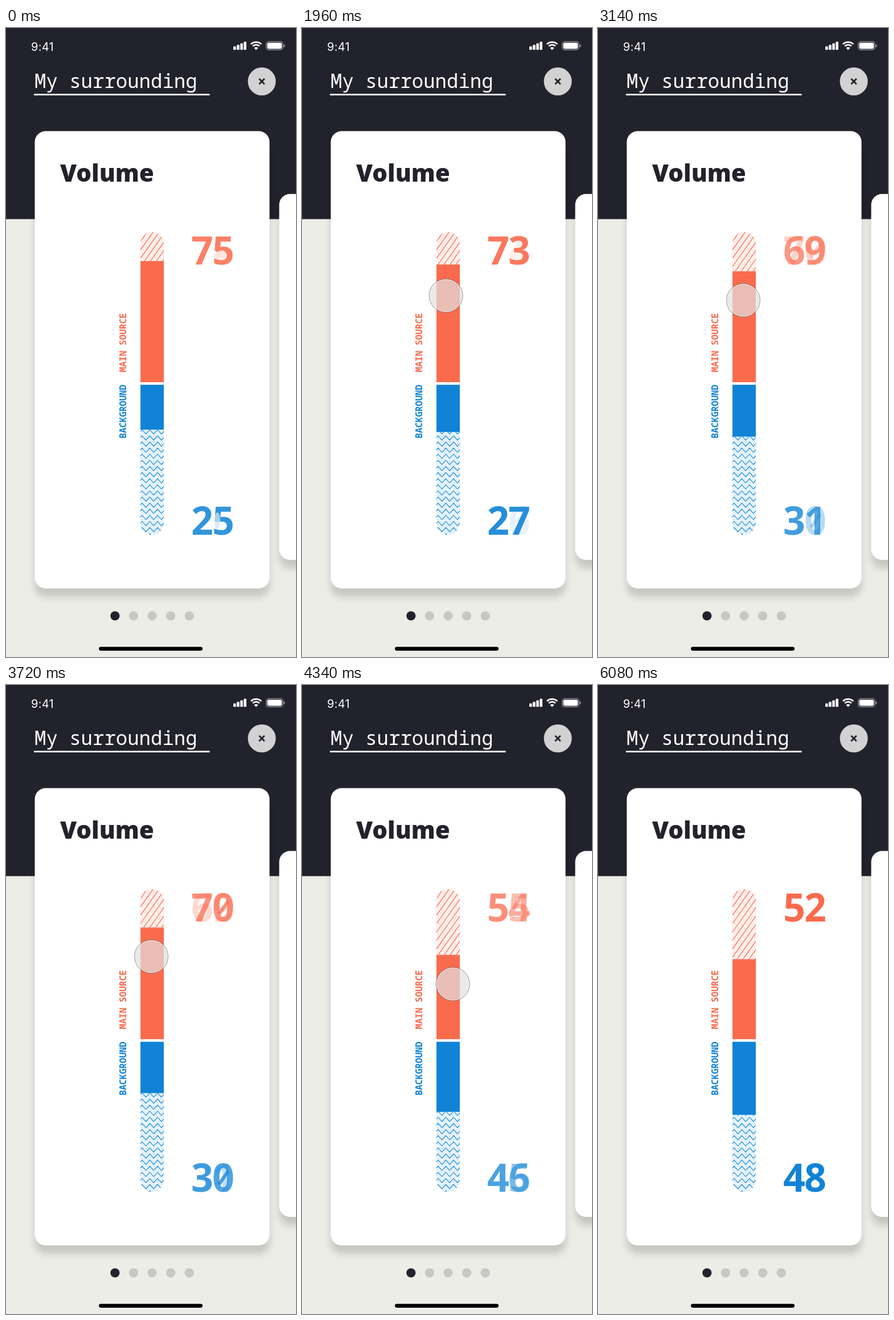
These frames come from a looping animation (509 by 1101 pixels, 7.14 s). An HTML page with a canvas:

```html
<!DOCTYPE html>
<html lang="en">
<head>
<meta charset="utf-8">
<title>Volume mixer</title>
<style>
html, body { margin: 0; width: 100%; height: 100%; overflow: hidden; background: #ecede7; }
canvas { display: block; width: 509px; height: 1101px; }
</style>
</head>
<body>
<canvas id="stage" width="509" height="1101"></canvas>
<script>
const ctx = document.getElementById('stage').getContext('2d');
const LOOP = 7140;
const DARK = '#22222c', RED = '#fa6b4e', BLUE = '#1083d6';
const MONO = '"Noto Sans Mono", "DejaVu Sans Mono", monospace';
const SANS = '"Noto Sans", "Open Sans", sans-serif';
const BAR = { x: 236, w: 41, top: 357, bottom: 887, midTop: 620, midBottom: 624.5 };

// Each move: start, end, target, easing sharpness (0 = in-out, 1 = out)
const touchMoves = [
  [560, 700, [438, 330], 0.6],
  [940, 1640, [252, 458], 0],
  [1880, 2520, [255, 502], 0.67],
  [2700, 3420, [255, 475], 1],
  [3700, 4420, [265, 525], 0.05],
  [5940, 6080, [542, 222], 0.3]
];
const levelMoves = [
  [1880, 2520, [60.5], 0.3],
  [2700, 3460, [70], 1],
  [3700, 4560, [52], 0.18]
];

function ease(p, k) {
  const smooth = p * p * (3 - 2 * p);
  const out = 1 - (1 - p) ** 3;
  return smooth + (out - smooth) * k;
}

function follow(moves, start, t) {
  let at = start;
  for (const [from, to, target, k] of moves) {
    if (t <= from) break;
    const p = ease(Math.min(1, (t - from) / (to - from)), k);
    at = at.map((v, i) => v + (target[i] - v) * p);
  }
  return at;
}

function rect(x, y, w, h, color) {
  ctx.fillStyle = color;
  ctx.fillRect(x, y, w, h);
}

function round(x, y, w, h, r, color) {
  ctx.beginPath();
  ctx.roundRect(x, y, w, h, r);
  ctx.fillStyle = color;
  ctx.fill();
}

function disc(x, y, r, color) {
  ctx.beginPath();
  ctx.arc(x, y, r, 0, Math.PI * 2);
  ctx.fillStyle = color;
  ctx.fill();
}

function text(str, x, y, font, color, spacing = 0) {
  ctx.font = font;
  ctx.letterSpacing = spacing + 'px';
  ctx.fillStyle = color;
  ctx.fillText(str, x, y);
}

function statusBar() {
  text('9:41', 44, 39.5, '400 20px Inter, "Liberation Sans", sans-serif', '#fff', 0.3);
  for (let i = 0; i < 4; i++) {
    const h = 6 + i * 2.8;
    round(399 + i * 6.1, 38.3 - h, 4.6, h, 1, '#fff');
  }
  ctx.strokeStyle = '#fff';
  ctx.lineWidth = 2.8;
  for (const r of [8.2, 12.9]) {
    ctx.beginPath();
    ctx.arc(439, 37.5, r, -Math.PI * 0.75, -Math.PI * 0.25);
    ctx.stroke();
  }
  ctx.beginPath();
  ctx.moveTo(439, 38.5);
  ctx.arc(439, 38.5, 5, -Math.PI * 0.75, -Math.PI * 0.25);
  ctx.fillStyle = '#fff';
  ctx.fill();

  ctx.strokeStyle = '#9a9a9f';
  ctx.lineWidth = 1.2;
  ctx.beginPath();
  ctx.roundRect(456.6, 23.9, 29.6, 14.4, 4);
  ctx.stroke();
  round(458.5, 25.8, 25.8, 10.6, 2.4, '#fff');
  round(487.5, 28.7, 1.8, 5, 1, '#9a9a9f');
}

function header() {
  rect(0, 0, 509, 1101, '#ecede7');
  rect(0, 0, 509, 334.5, DARK);
  statusBar();
  text('My surrounding', 50, 104.5, '300 34px ' + MONO, '#fff');
  rect(49, 115.2, 308.5, 2.7, '#fff');
  disc(449, 93.5, 24.5, '#d2d2d3');
  ctx.strokeStyle = DARK;
  ctx.lineWidth = 3;
  ctx.beginPath();
  ctx.moveTo(444.3, 88.8);
  ctx.lineTo(453.7, 98.2);
  ctx.moveTo(453.7, 88.8);
  ctx.lineTo(444.3, 98.2);
  ctx.stroke();
}

function card(x, y, w, h) {
  ctx.save();
  ctx.shadowColor = 'rgba(0,0,0,.16)';
  ctx.shadowBlur = 13;
  ctx.shadowOffsetY = 15;
  round(x, y, w, h, 19, '#fff');
  ctx.restore();
}

function label(str, y, color) {
  ctx.save();
  ctx.translate(210.7, y);
  ctx.rotate(-Math.PI / 2);
  text(str, 0, 0, '600 15.7px ' + MONO, color);
  ctx.restore();
}

function hatch(bottom) {
  ctx.save();
  ctx.beginPath();
  ctx.rect(BAR.x, BAR.top, BAR.w, bottom - BAR.top);
  ctx.clip();
  rect(BAR.x, BAR.top, BAR.w, bottom - BAR.top, '#feeeea');
  ctx.strokeStyle = RED;
  ctx.lineWidth = 1.2;
  ctx.beginPath();
  for (let x = 243 - 126; x < 400; x += 10.5) {
    ctx.moveTo(x, 408);
    ctx.lineTo(x + 60, 408 - 84);
    ctx.moveTo(x, 408);
    ctx.lineTo(x - 60, 408 + 84);
  }
  ctx.stroke();
  ctx.restore();
}

function zigzag(top) {
  ctx.save();
  ctx.beginPath();
  ctx.rect(BAR.x, top, BAR.w, BAR.bottom - top);
  ctx.clip();
  rect(BAR.x, top, BAR.w, BAR.bottom - top, '#e3f2fc');
  ctx.strokeStyle = BLUE;
  ctx.lineWidth = 1.1;
  ctx.beginPath();
  for (let y = 692.5; y < 892; y += 10.7) {
    ctx.moveTo(232, y + 7.5);
    for (let i = 1; i < 8; i++) ctx.lineTo(232 + i * 6.8, y + (i % 2 ? 0 : 7.5));
  }
  ctx.stroke();
  ctx.restore();
}

function slider(level) {
  const top = 408 + (75 - level) * 3.13;
  const bottom = 703 + (75 - level) * 2.15;
  ctx.save();
  ctx.beginPath();
  ctx.roundRect(BAR.x, BAR.top, BAR.w, BAR.bottom - BAR.top, 20.5);
  ctx.clip();
  hatch(top);
  zigzag(bottom);
  rect(BAR.x, top, BAR.w, BAR.midTop - top, RED);
  rect(BAR.x, BAR.midTop, BAR.w, BAR.midBottom - BAR.midTop, '#fff');
  rect(BAR.x, BAR.midBottom, BAR.w, bottom - BAR.midBottom, BLUE);
  ctx.restore();
}

function figure(n, y, color, alpha) {
  if (alpha < 0.02) return;
  ctx.globalAlpha = alpha;
  text(String(n), 325, y, '700 68px ' + SANS, color, -1.8);
  if (n % 10 === 0) {
    ctx.strokeStyle = color;
    ctx.lineWidth = 6;
    ctx.beginPath();
    ctx.moveTo(374, y - 13);
    ctx.lineTo(390, y - 36);
    ctx.stroke();
  }
  ctx.globalAlpha = 1;
}

function figures(level) {
  const low = Math.floor(level);
  const mix = level - low;
  const rest = level === 75 ? 0.86 : 1;
  for (const [n, a] of [[low, 1 - mix], [low + 1, mix]]) {
    figure(n, 414, RED, a * rest);
    figure(100 - n, 887, BLUE, a * rest);
  }
  if (rest < 1) {
    // Faint smudges on the resting digits
    disc(371, 398, 5.5, 'rgba(253,226,219,.9)');
    disc(379, 397, 8, 'rgba(253,226,219,.8)');
    ctx.beginPath();
    ctx.ellipse(371, 863, 5, 15, 0, 0, Math.PI * 2);
    ctx.fillStyle = 'rgba(207,230,247,.75)';
    ctx.fill();
  }
}

function touch(x, y) {
  disc(x, y, 29.2, 'rgba(226,226,226,.7)');
  const ring = (r, color) => {
    ctx.beginPath();
    ctx.arc(x, y, r, 0, Math.PI * 2);
    ctx.strokeStyle = color;
    ctx.lineWidth = 1;
    ctx.stroke();
  };
  ring(28.5, 'rgba(255,255,255,.75)');
  ring(29.4, 'rgba(70,70,70,.6)');
}

function draw(t) {
  const [level] = follow(levelMoves, [75], t);
  const [x, y] = follow(touchMoves, [542, 135], t);
  header();
  card(479.5, 290.5, 120, 640.5);
  card(50.5, 180.5, 412, 800.5);
  text('Volume', 95, 268.8, '800 42px "Open Sans", "Noto Sans", sans-serif', DARK);
  label('MAIN SOURCE', 602.5, RED);
  label('BACKGROUND', 718.5, BLUE);
  slider(level);
  figures(level);
  for (let i = 0; i < 5; i++) disc(191.3 + i * 32.6, 1029, 8.1, i ? '#c7c7c5' : DARK);
  round(163, 1083.3, 182, 6.6, 3.3, '#000');
  if (t > 560 && t < 6080) touch(x, y);
}

const begin = performance.now();
function tick() {
  draw((performance.now() - begin) % LOOP);
  requestAnimationFrame(tick);
}
tick();
</script>
</body>
</html>
```
